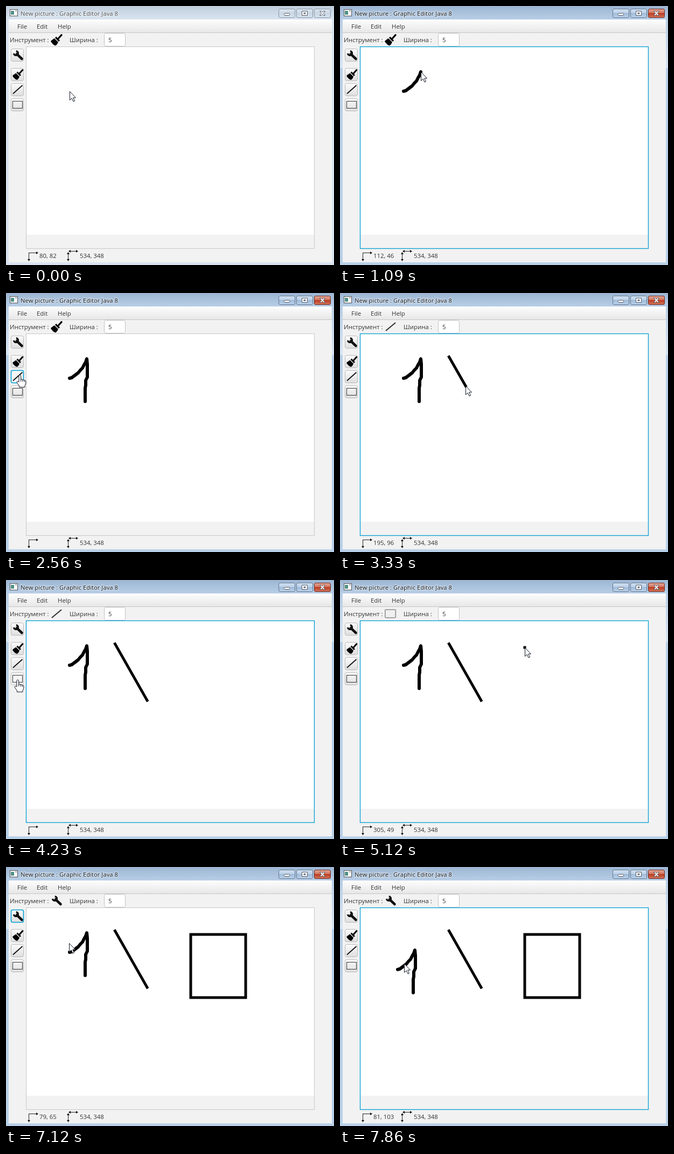
An HTML page for the animation above (8000 ms loop, 609 by 480 pixels).

```html
<!DOCTYPE html>
<html lang="en">
<head>
<meta charset="utf-8">
<title>Graphic editor</title>
<style>
html, body { margin: 0; width: 100%; height: 100%; overflow: hidden; }
svg { display: block; }
text { font: 11.4px "Open Sans", "Noto Sans", sans-serif; fill: #333; white-space: pre; }
.caption { font-size: 11.3px; fill: #222; stroke: #fff; stroke-opacity: .35; stroke-width: 3px; paint-order: stroke; }
.inactive .caption { fill: #555; }
.active .idle, .inactive .live { display: none; }
.button { fill: url(#face); stroke: #b9b9b9; }
.button.focus { stroke: #039ed3; stroke-width: 1.6px; }
.button.hover { fill: #f6f6f6; }
.area { fill: none; stroke: #c8c8c8; }
.area.focus { stroke: #039ed3; stroke-width: 1.3px; }
.drawing { fill: none; stroke: #000; }
</style>
</head>
<body>
<svg id="stage" class="inactive" width="609" height="480" viewBox="0 0 609 480">
  <defs>
    <linearGradient id="idleTop" x2="0" y2="1"><stop stop-color="#bfcddc"/><stop offset="1" stop-color="#dae5f0"/></linearGradient>
    <linearGradient id="liveTop" x2="0" y2="1"><stop stop-color="#9cb6d3"/><stop offset="1" stop-color="#b8cee6"/></linearGradient>
    <linearGradient id="liveSide" x2="0" y2="1"><stop stop-color="#b8cee6"/><stop offset="1" stop-color="#d9e6f4"/></linearGradient>
    <linearGradient id="menu" x2="0" y2="1"><stop stop-color="#fff"/><stop offset=".1" stop-color="#fbfbfb"/><stop offset="1" stop-color="#e6e6e6"/></linearGradient>
    <linearGradient id="face" x2="0" y2="1"><stop stop-color="#fbfbfb"/><stop offset="1" stop-color="#dedede"/></linearGradient>
    <linearGradient id="idleBox" x2="0" y2="1"><stop stop-color="#dce6f0"/><stop offset=".5" stop-color="#cad7e4"/><stop offset="1" stop-color="#d8e3ee"/></linearGradient>
    <linearGradient id="liveBox" x2="0" y2="1"><stop stop-color="#d0dff0"/><stop offset=".48" stop-color="#bdd1e8"/><stop offset=".5" stop-color="#9fbad8"/><stop offset="1" stop-color="#bcd3ec"/></linearGradient>
    <linearGradient id="closeBox" x2="0" y2="1"><stop stop-color="#e6a795"/><stop offset=".48" stop-color="#d0745d"/><stop offset=".5" stop-color="#bd3c22"/><stop offset="1" stop-color="#d2765a"/></linearGradient>
    <g id="brush">
      <path d="M18.8 1.5 13.5 7.5" stroke="#000" stroke-width="3" stroke-linecap="round"/>
      <path d="M9.5 4.5 16 11 13.8 13 7.5 6.5Z"/>
      <path d="M6.5 7.5 13 14Q11.5 18 8.5 20 3.5 18.5 0 12.5 1.5 10.5 6.5 7.5Z"/>
    </g>
    <g id="wrench" fill="none" stroke="#111">
      <path d="M6.8 2.6A3.9 3.9 0 1 1 2.6 6.8" stroke-width="3.4"/>
      <path d="M8 8 17.5 17" stroke-width="4.6" stroke-linecap="round"/>
    </g>
    <path id="line" d="M1 17.5 18.5 2" stroke="#111" stroke-width="1.8"/>
    <rect id="rect" x=".5" y="3.5" width="18" height="13" fill="none" stroke="#333"/>
  </defs>

  <g class="idle">
    <rect width="609" height="480" fill="#d9e4f0"/>
    <rect width="609" height="25" fill="url(#idleTop)"/>
  </g>
  <g class="live">
    <rect width="609" height="480" fill="#b9d1ea"/>
    <rect y="25" width="609" height="90" fill="url(#liveSide)"/>
    <rect width="609" height="25" fill="url(#liveTop)"/>
  </g>
  <rect x="7.5" y="6.5" width="14" height="12" fill="#fff" stroke="#555"/>
  <path d="M9 9h6v7H9z" fill="#4f8f85"/>
  <path d="M17 9h3" stroke="#444"/>
  <text class="caption" x="27" y="18">New picture : Graphic Editor Java 8</text>

  <g class="idle" fill="url(#idleBox)" stroke="#8b98a7">
    <rect x="506.5" y="5.5" width="30" height="16" rx="2.5"/><rect x="539.5" y="5.5" width="30" height="16" rx="2.5"/><rect x="572.5" y="5.5" width="30" height="16" rx="2.5"/>
  </g>
  <g class="live" fill="url(#liveBox)" stroke="#647890">
    <rect x="506.5" y="5.5" width="30" height="16" rx="2.5"/><rect x="539.5" y="5.5" width="30" height="16" rx="2.5"/><rect x="572.5" y="5.5" width="30" height="16" rx="2.5" fill="url(#closeBox)" stroke="#6a2a24"/>
  </g>
  <g fill="#fff" stroke="#515b69">
    <rect x="516.5" y="13.5" width="10" height="4" rx="1"/>
    <path fill-rule="evenodd" d="M549.5 9.5h10v8h-10zM553 12.5v2h3v-2z"/>
    <path d="M582.5 9.5h3l2 2 2-2h3l-3.2 4 3.2 4h-3l-2-2-2 2h-3l3.2-4z"/>
  </g>

  <rect x="5" y="25" width="600" height="450" fill="#f2f2f2"/>
  <rect x="5" y="25" width="600" height="25" fill="url(#menu)"/>
  <path d="M5 49.5h600" stroke="#c6c6c6"/>
  <text x="21" y="42">File</text><text x="57" y="42">Edit</text><text x="96" y="42">Help</text>
  <text x="7" y="67">Инструмент :</text><text x="118" y="67">Ширина :</text>
  <rect x="182.5" y="50.5" width="39" height="24" rx="3" fill="#fff" stroke="#c0c0c0"/>
  <text x="190" y="67">5</text>

  <g id="tools"></g>
  <g id="current"></g>

  <rect x="38" y="76" width="534" height="348" fill="#fff"/>
  <rect id="area" class="area" x="37.5" y="75.5" width="535" height="374"/>
  <g class="drawing">
    <path id="digit" stroke-width="6" stroke-linejoin="round" stroke-linecap="round"/>
    <path id="slope" stroke-width="5" stroke-linecap="square"/>
    <path id="box" stroke-width="5" stroke-linecap="square"/>
  </g>

  <g fill="none" stroke="#222">
    <path d="M43 457.5H58M42.5 457V471M118 454.5H132M115.5 458V471"/>
    <path fill="#111" stroke="none" d="M56 455l4 2.5-4 2.5zM40 469h5l-2.5 4zM120 452v5l-4-2.5zM130 452l4 2.5-4 2.5zM113 460h5l-2.5-4zM113 469h5l-2.5 4z"/>
  </g>
  <text id="place" x="62" y="467"></text>
  <text x="137" y="467">534, 348</text>

  <g id="cursor" fill="#fff" stroke="#111827" stroke-linejoin="round">
    <path id="arrow" d="M.5.5V16.5L4.2 13 7 19 9.5 18 6.8 12H11.5Z"/>
    <path id="hand" d="M-2 13V1.8A1.8 1.8 0 0 1 1.6 1.8V8q3-1 3.3 1 3-.8 3.2 1 2.7-.5 2.7 1.9V16L9 19.6V22.5H-1.5V20L-5.4 14.5q-1.1-2.8 1-2.7Q-3 11.8-2 13ZM1.6 8v4M4.9 9v3.5M8.1 10v3"/>
  </g>
</svg>
<script>
const LOOP = 8000, LEFT = 38, TOP = 76;
const $ = id => document.getElementById(id);

// time, x, y
const scribble = [
  [640, 118, 158], [740, 122, 157], [780, 126, 154], [830, 130, 151], [870, 134, 148],
  [910, 138, 143], [960, 142, 139], [1000, 145, 133], [1040, 148, 128], [1090, 150, 122],
  [1220, 150, 122], [1280, 151, 132], [1340, 151, 145], [1390, 151, 156], [1420, 149, 160],
  [1460, 148, 162], [1510, 148, 171], [1550, 147, 176], [1660, 147, 201]
];
const path = [
  [0, 118, 158], ...scribble,
  [1930, 147, 201], [2550, 26, 152], [2650, 26, 152],
  [3080, 202, 117], [3110, 202, 117], [3540, 262, 223],
  [3800, 262, 223], [4220, 22, 185], [4480, 22, 185],
  [5070, 343, 125], [5150, 343, 125], [5560, 445, 242], [5600, 445, 242],
  [6060, 18, 100], [6150, 16, 93], [6570, 16, 93],
  [7270, 130, 147], [7530, 130, 147], [7860, 119, 179], [LOOP, 119, 179]
];
const focusAt = [[0, ''], [640, 'area'], [2540, 'line'], [3090, 'area'], [4450, 'rect'],
  [5090, 'area'], [6440, 'wrench'], [7530, 'area']];
const toolAt = [[0, 'brush'], [2640, 'line'], [4530, 'rect'], [6580, 'wrench']];
const buttons = { wrench: 79, brush: 115, line: 143, rect: 171 };

for (const [name, y] of Object.entries(buttons)) {
  $('tools').innerHTML += `<rect id="b-${name}" class="button" x="9.5" y="${y + .5}" width="23" height="23" rx="3"/>
    <use href="#${name}" x="12" y="${y + 2}"/>`;
}
const icons = {
  brush: '<use href="#brush" transform="translate(83 52) scale(1.07)"/>',
  wrench: '<use href="#wrench" x="84" y="52"/>',
  line: '<path d="M85 70 103 55" stroke="#333" stroke-width="2.2"/>',
  rect: '<rect x="83.8" y="54.8" width="19.5" height="15" rx="1.5" fill="#f0f0f0" stroke="#999" stroke-width="1.8"/>'
};
for (const name in icons) $('current').innerHTML += `<g id="i-${name}">${icons[name]}</g>`;

const stateAt = (table, t) => table.findLast(row => row[0] <= t)[1];

function cursorAt(t) {
  const i = Math.max(1, path.findIndex(p => p[0] > t));
  const [t0, x0, y0] = path[i - 1], [t1, x1, y1] = path[i];
  let k = (t - t0) / (t1 - t0);
  if (t1 - t0 > 150) k = k * k * (3 - 2 * k);
  return [x0 + (x1 - x0) * k, y0 + (y1 - y0) * k];
}

// Position of a drag that ends at the given time
const dragTo = (t, end) => cursorAt(Math.min(t, end));
const show = (el, on) => el.style.display = on ? '' : 'none';

function draw(t) {
  const [x, y] = cursorAt(t);
  const focus = stateAt(focusAt, t), tool = stateAt(toolAt, t);
  const overButton = name => x >= 9 && x < 33 && y >= buttons[name] && y < buttons[name] + 24;
  const names = Object.keys(buttons);

  $('stage').setAttribute('class', t < 640 ? 'inactive' : 'active');
  $('area').classList.toggle('focus', focus === 'area');
  for (const name of names) {
    $('b-' + name).classList.toggle('focus', focus === name);
    $('b-' + name).classList.toggle('hover', overButton(name));
    show($('i-' + name), tool === name);
  }

  const pointing = names.some(overButton);
  show($('hand'), pointing);
  show($('arrow'), !pointing);
  $('cursor').setAttribute('transform', `translate(${Math.round(x)} ${Math.round(y)})`);
  const inside = x >= LEFT && x < LEFT + 534 && y >= TOP && y < TOP + 348;
  $('place').textContent = inside ? `${Math.round(x) - LEFT}, ${Math.round(y) - TOP}` : '';

  const dots = t < 640 ? [] : [...scribble.filter(p => p[0] <= t).map(p => p.slice(1)), dragTo(t, 1660)];
  $('digit').setAttribute('d', dots.length ? 'M' + dots.join('L') : '');
  const [dx, dy] = t < 7530 ? [0, 0] : [x - 130, y - 147];
  $('digit').setAttribute('transform', `translate(${dx} ${dy})`);

  $('slope').setAttribute('d', t < 3090 ? '' : `M202.5 118.5L${dragTo(t, 3540)}`);
  const [bx, by] = dragTo(t, 5560);
  $('box').setAttribute('d', t < 5090 ? '' : `M343 125H${bx}V${by}H343Z`);
}

const start = performance.now();
function tick() {
  draw((performance.now() - start) % LOOP);
  requestAnimationFrame(tick);
}
tick();
</script>
</body>
</html>
```
